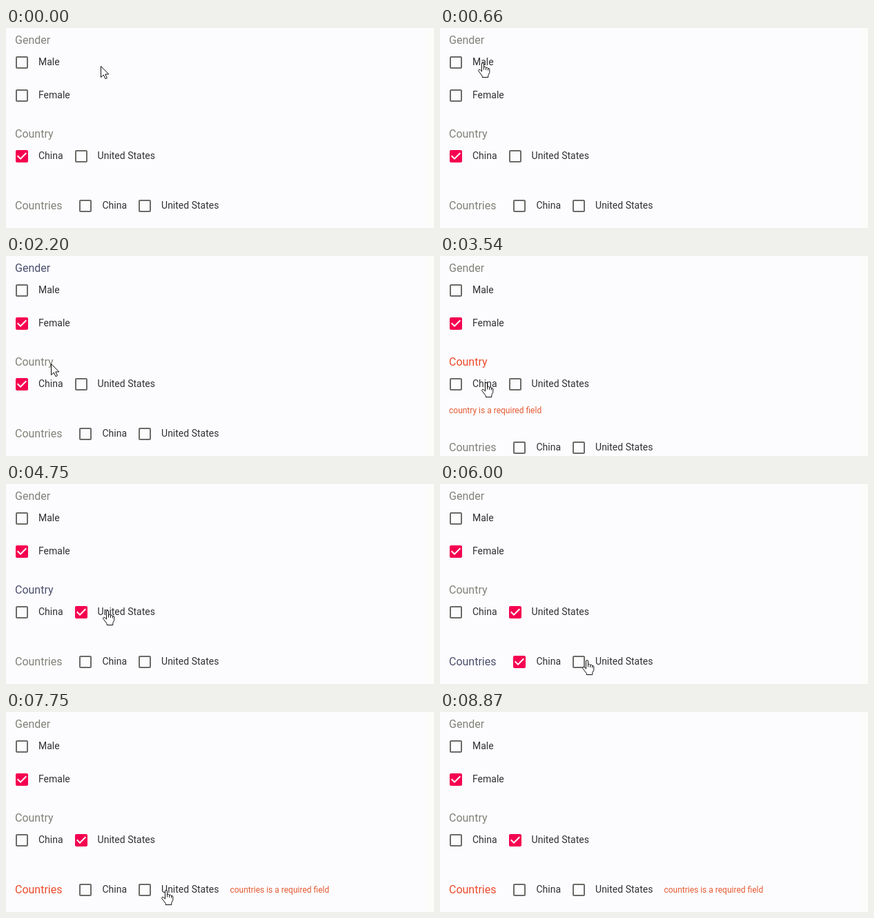
An HTML page for the animation above (8.91 s loop, 620x290 px).

```html
<!DOCTYPE html>
<html lang="en">
<head>
<meta charset="utf-8">
<title>Checkbox groups</title>
<style>
  html, body { margin: 0; width: 100%; height: 100%; overflow: hidden; background: #fcfcff; }
  svg { display: block; width: 620px; height: 290px; font-family: Roboto, sans-serif; }
  .legend { font-size: 16px; }
  .label { font-size: 14px; fill: #313133; }
  .help { font-size: 12px; fill: #e55a30; }
  .idle { fill: #828278; }
  .focus { fill: #4b4f6c; }
  .error { fill: #ec4c2a; }
  .off { fill: #6b6b68; }
  .on { fill: #f50050; }
  .pointer { stroke: #111; stroke-linejoin: round; fill: #fff; }
</style>
</head>
<body>
<svg id="stage" viewBox="0 0 620 290">
  <rect x="608" width="12" height="290" fill="#fcfcfa"/>
</svg>
<script>
const LOOP = 8910, PRESS = 90;
const stage = document.getElementById('stage');

const OFF = 'M19 5v14H5V5h14m0-2H5c-1.1 0-2 .9-2 2v14c0 1.1.9 2 2 2h14c1.1 0 2-.9 2-2V5c0-1.1-.9-2-2-2z';
const ON = 'M19 3H5c-1.11 0-2 .9-2 2v14c0 1.1.89 2 2 2h14c1.11 0 2-.9 2-2V5c0-1.1-.89-2-2-2zm-9 14l-5-5 1.41-1.41L10 14.17l7.59-7.59L19 8l-9 9z';
const ARROW = 'M.5.5V16.5L4.3 13 7 18.7 9.4 17.6 6.8 12H11.8Z';
const HAND = 'M-.5 13V2Q-.5.5 1 .5T2.5 2V6.5Q4.9 5.4 5.6 7.4 7.9 6.4 8.5 8.5 10.6 7.8 10.8 10V14.5L8.8 18.5V21.5H.2V19.5L-5 12.6Q-6 10.8-4.4 10.3-3 10-.5 13ZM2.5 6.5V10.5M5.6 7.4V11M8.5 8.5V11.5';

function add(parent, tag, attrs, text) {
  const el = document.createElementNS('http://www.w3.org/2000/svg', tag);
  for (const k in attrs) el.setAttribute(k, attrs[k]);
  if (text) el.textContent = text;
  parent.appendChild(el);
  return el;
}

function makeGroup(name, y, options, { column, inline, multiple, checked = [] } = {}) {
  const root = add(stage, 'g', {});
  const title = name[0].toUpperCase() + name.slice(1);
  const legend = add(root, 'text', { x: 13, y, class: 'legend idle' }, title);
  let x = inline ? 35 + legend.getComputedTextLength() : 11;
  let top = inline ? y - 17 : y + 15;
  const boxes = options.map(text => {
    const icon = add(root, 'path', { transform: `translate(${Math.round(x)} ${top})` });
    const label = add(root, 'text', { x: x + 36, y: top + 16, class: 'label' }, text);
    const end = x + 36 + label.getComputedTextLength();
    const item = { icon, left: x - 12, right: end, top: top - 12 };
    if (column) top += 48; else x = end + 14;
    return item;
  });
  const spot = inline ? { x: x + 2, y: y - 1 } : { x: 13, y: y + 69 };
  const help = add(root, 'text', { ...spot, class: 'help' }, name + ' is a required field');
  return { root, legend, boxes, help, multiple, checked };
}

const places = ['China', 'United States'];
const groups = [
  makeGroup('gender', 23, ['Male', 'Female'], { column: true }),
  makeGroup('country', 159, places, { checked: [0] }),
  makeGroup('countries', 263, places, { inline: true, multiple: true })
];
const [, country, countries] = groups;

const arrow = add(stage, 'path', { class: 'pointer', d: ARROW });
const hand = add(stage, 'path', { class: 'pointer', d: HAND });

// Each move glides to x, y and may press option `box` of group `in` afterwards.
const START = { x: 137, y: 55 };
const MOVES = [
  { from: 40, to: 500, x: 61, y: 50, press: 600, in: 0, box: 0 },
  { from: 910, to: 1250, x: 55, y: 97, press: 1340, in: 0, box: 1 },
  { from: 1480, to: 1830, x: 63, y: 114 },
  { from: 1870, to: 2450, x: 66, y: 183, press: 2750, in: 1, box: 0 },
  { from: 3910, to: 4350, x: 146, y: 183, press: 4400, in: 1, box: 1 },
  { from: 4830, to: 5410, x: 142, y: 255, press: 5580, in: 2, box: 0 },
  { from: 5700, to: 6000, x: 212, y: 255, press: 6290, in: 2, box: 1 },
  { from: 6450, to: 6800, x: 142, y: 255, press: 6840, in: 2, box: 0 },
  { from: 7250, to: 7500, x: 232, y: 256, press: 7550, in: 2, box: 1 },
  { from: 7700, to: 8120, x: 205, y: 300 }
];

function pointerAt(t) {
  let { x, y } = START;
  for (const m of MOVES) {
    const u = Math.min(1, Math.max(0, (t - m.from) / (m.to - m.from)));
    const e = u * u * (3 - 2 * u);
    x += (m.x - x) * e;
    y += (m.y - y) * e;
  }
  return [Math.round(x), Math.round(y)];
}

// Pressing takes the focus away; releasing toggles the option and checks its group.
function stateAt(t) {
  const state = groups.map(g => ({ on: new Set(g.checked), look: 'idle' }));
  for (const m of MOVES) {
    if (!(t >= m.press)) continue;
    for (const s of state) if (s.look === 'focus') s.look = 'idle';
    if (t < m.press + PRESS) continue;
    const s = state[m.in], had = s.on.has(m.box);
    if (!groups[m.in].multiple) s.on.clear();
    if (had) s.on.delete(m.box); else s.on.add(m.box);
    s.look = s.on.size ? 'focus' : 'error';
  }
  return state;
}

const overOption = (x, y) => groups.some(g => g.boxes.some(b =>
  x >= b.left && x <= b.right && y >= b.top && y < b.top + 48));

const show = (el, visible) => { el.style.display = visible ? '' : 'none'; };

function draw(t) {
  const state = stateAt(t);
  groups.forEach((g, i) => {
    const { on, look } = state[i];
    g.legend.setAttribute('class', 'legend ' + look);
    show(g.help, look === 'error');
    g.boxes.forEach(({ icon }, k) => {
      icon.setAttribute('d', on.has(k) ? ON : OFF);
      icon.setAttribute('class', on.has(k) ? 'on' : 'off');
    });
  });
  const shift = state[groups.indexOf(country)].look === 'error' ? 20 : 0;
  countries.root.setAttribute('transform', `translate(0 ${shift})`);

  const [x, y] = pointerAt(t), over = overOption(x, y);
  show(hand, over);
  show(arrow, !over);
  (over ? hand : arrow).setAttribute('transform', `translate(${x} ${y})`);
}

const began = performance.now();
function tick() {
  draw((performance.now() - began) % LOOP);
  requestAnimationFrame(tick);
}
tick();
</script>
</body>
</html>
```
